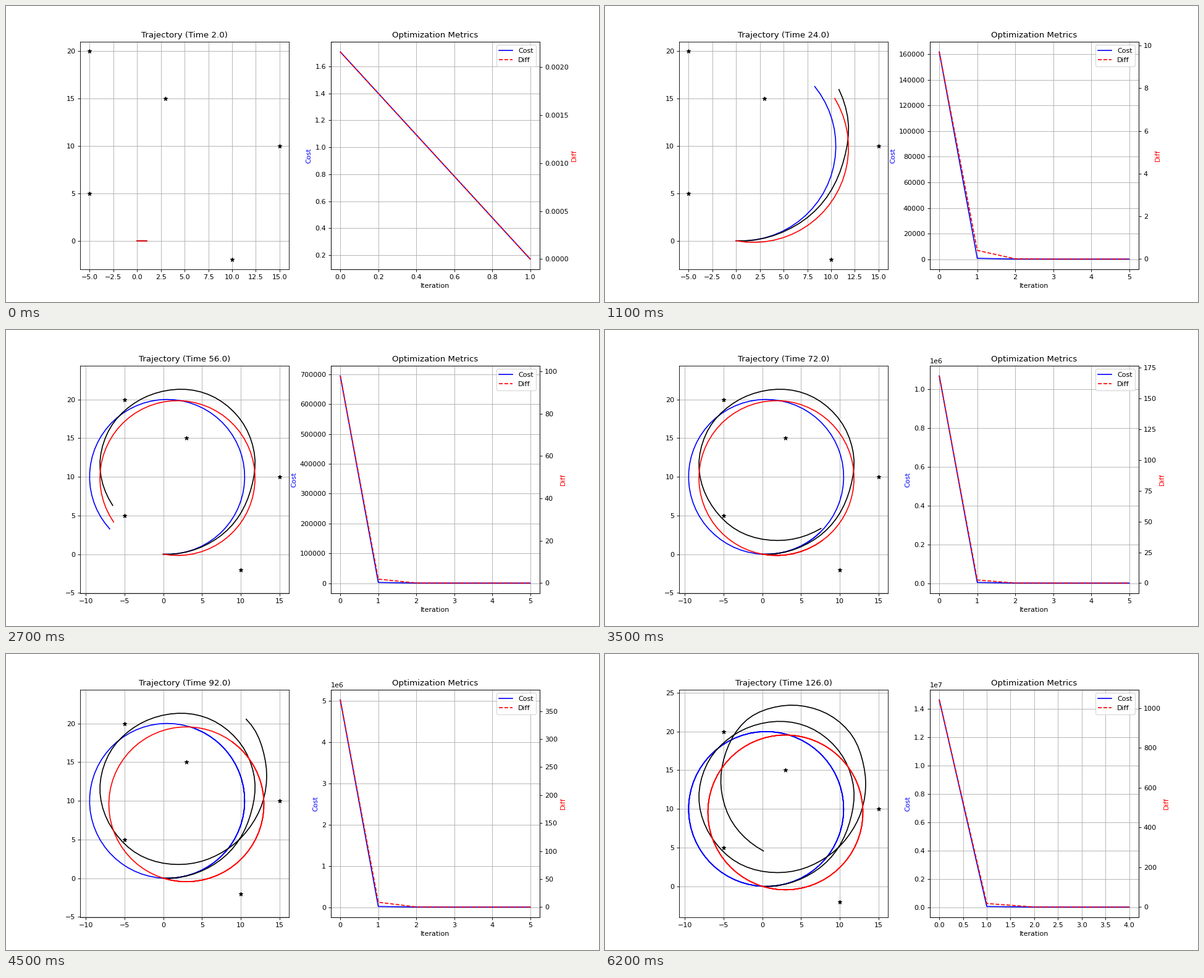
Recreate the animation shown at these times as a matplotlib script. Size 960 by 480 pixels, loop 6300 ms.

```python
import numpy as np
import matplotlib.pyplot as plt
from matplotlib.animation import FuncAnimation

FRAMES, INTERVAL = 63, 100
STEPS = np.arange(2 * FRAMES)
YAW_RATE = 0.1
LOOP_CLOSURE = 80  # second lap: known landmarks come back into view

LANDMARKS = np.array([(10, -2), (15, 10), (3, 15), (-5, 20), (-5, 5)])

# Dead-reckoned position after every fifth step
FIX_EVERY = 5
FIXES = np.array([
    (0, 0), (4.87, 0.9), (8.92, 3.8), (11.25, 8.2), (11.74, 13.1),
    (9.76, 17.65), (5.76, 20.66), (0.9, 21.22), (-3.8, 19.46), (-7.1, 15.85),
    (-8.15, 11), (-6.52, 6.3), (-2.9, 2.9), (2, 1.77), (6.7, 2.86),
    (10.6, 5.85), (12.95, 10.25), (13.17, 15.15), (11.35, 19.8), (7.45, 22.71),
    (2.55, 23.32), (-2, 21.5), (-4.68, 17.35), (-5.27, 12.4), (-3.55, 7.8),
    (0.15, 4.57)])

# Time, first cost and first diff of the optimisation
METRICS = np.array([
    (2, 1.708, 0.00216), (24, 161900, 9.7), (42, 424000, 52.5),
    (72, 1.07e6, 168.5), (92, 5.03e6, 370), (110, 9.9e6, 708.3),
    (126, 1.4654e7, 1041.5)])


def true_path():
    yaw = YAW_RATE * STEPS[:-1]
    move = np.column_stack([np.cos(yaw), np.sin(yaw)])
    return np.vstack([[0, 0], np.cumsum(move, axis=0)])


def drifted_path(true):
    """Add the smoothly interpolated drift between the fixes (cubic Hermite)."""
    drift = FIXES - true[::FIX_EVERY]
    slope = np.gradient(drift, axis=0, edge_order=2)
    i = np.minimum(STEPS // FIX_EVERY, len(FIXES) - 2)
    u = (STEPS / FIX_EVERY - i)[:, None]
    return (true
            + (1 + 2 * u) * (1 - u)**2 * drift[i]
            + u * (1 - u)**2 * slope[i]
            + u**2 * (3 - 2 * u) * drift[i + 1]
            + u**2 * (u - 1) * slope[i + 1])


def rotate(points, degrees):
    a = np.radians(degrees)
    c, s = np.cos(a), np.sin(a)
    return points @ np.array([[c, s], [-s, c]])


def ramp(t, start, end):
    return np.clip((t - start) / (end - start), 0, 1)


def estimate_tilt(t):
    """The estimate turns away early on and again at the loop closure."""
    return -7.7 * ramp(t, 2, 14) - 6.8 * ramp(t, LOOP_CLOSURE - 6, LOOP_CLOSURE + 8)


def first_values(t):
    """Power-law growth of cost and diff between the key times."""
    log_time, *log_values = np.log(METRICS).T
    return [np.exp(np.interp(np.log(t), log_time, v)) for v in log_values]


def metric_curves(t):
    """Cost and diff over the iterations: one big drop, then almost flat."""
    count = min(1 + t // 4, 5) if t < 100 else 4
    cost, diff = first_values(t)
    fade = 0.03 ** np.arange(count)
    cost_drop = 0.003 + 0.386 / t**2
    diff_drop = (1.1 if t < LOOP_CLOSURE else 2.2) * (t - 2) / t**2
    return (np.arange(count + 1),
            cost * np.r_[1, 0.0006 + cost_drop * fade],
            diff * np.r_[1, diff_drop * fade])


TRUE = true_path()
DEAD_RECKONING = drifted_path(TRUE)

fig, (ax, cost_axis) = plt.subplots(1, 2, figsize=(12, 6), dpi=80)
ax.plot(*LANDMARKS.T, "*k")
true_line, = ax.plot([], [], "-b")
dead_line, = ax.plot([], [], "-k")
estimate_line, = ax.plot([], [], "-r")
ax.axis("equal")
ax.grid(True)

diff_axis = cost_axis.twinx()
cost_line, = cost_axis.plot([], [], "b-", label="Cost")
diff_line, = diff_axis.plot([], [], "r--", label="Diff")
cost_axis.set_title("Optimization Metrics")
cost_axis.set_xlabel("Iteration")
cost_axis.set_ylabel("Cost", color="b")
diff_axis.set_ylabel("Diff", color="r")
cost_axis.grid(True)
diff_axis.legend(handles=[cost_line, diff_line], loc="upper right")


def update(frame):
    t = 2 * (frame + 1)
    true_line.set_data(*TRUE[:t].T)
    dead_line.set_data(*DEAD_RECKONING[:t].T)
    estimate_line.set_data(*rotate(TRUE[:t], estimate_tilt(t)).T)
    ax.set_title(f"Trajectory (Time {t:.1f})")

    iteration, cost, diff = metric_curves(t)
    cost_line.set_data(iteration, cost)
    diff_line.set_data(iteration, diff)

    for a in fig.axes:
        a.relim()
    for a in fig.axes:
        a.autoscale_view()


anim = FuncAnimation(fig, update, frames=FRAMES, interval=INTERVAL,
                     init_func=lambda: None, repeat=True)
plt.show()
```
